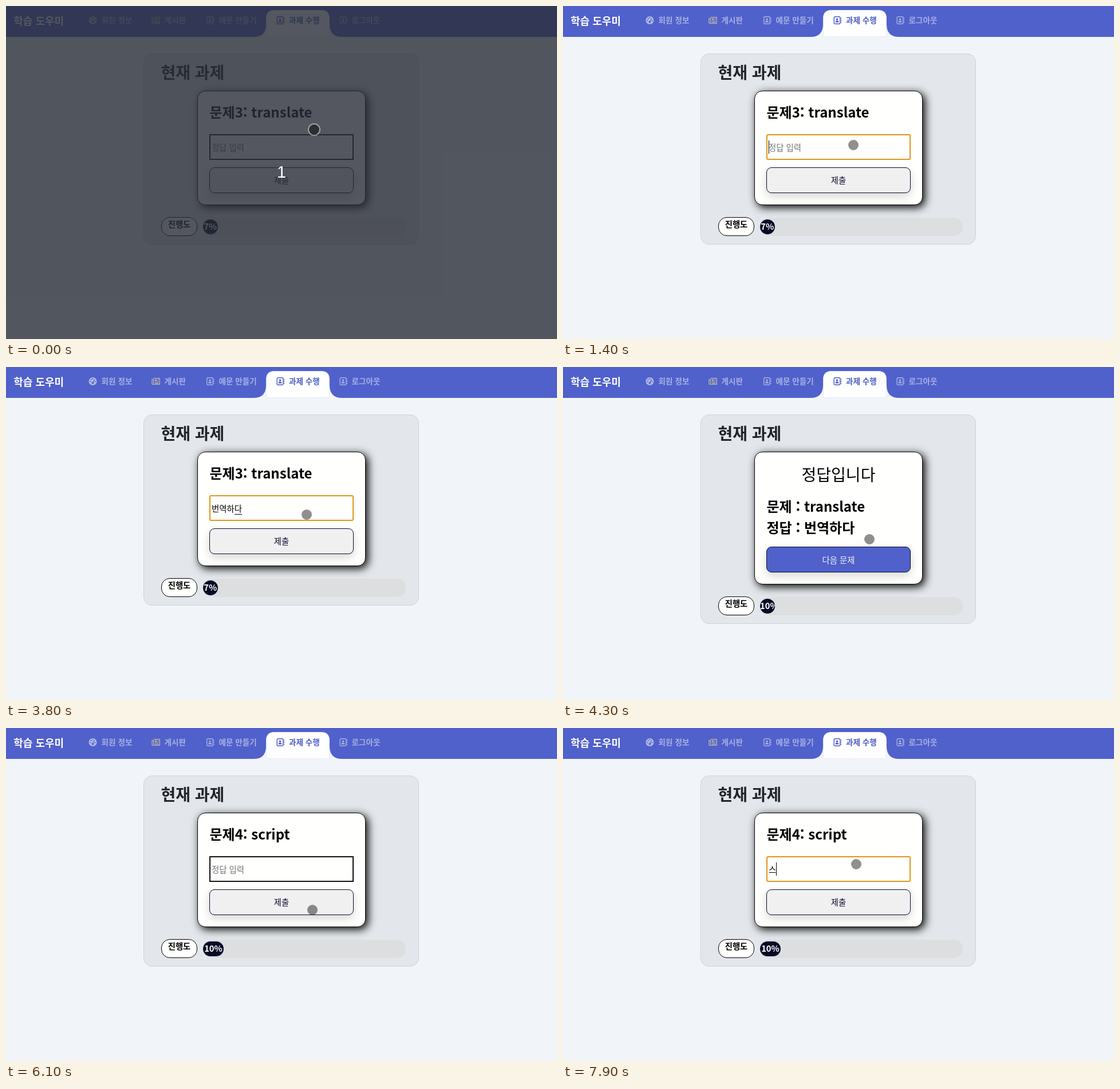
Write an HTML page that moves like this. It is 962 px wide and 582 px high and loops after 8 s.

```html
<!DOCTYPE html>
<html lang="ko">
<head>
<meta charset="utf-8">
<title>학습 도우미</title>
<style>
  html, body { margin: 0; width: 100%; height: 100%; overflow: hidden; }
  body { background: #f1f5fa; font-family: "Noto Sans CJK KR", "Noto Sans CJK", "Noto Sans", sans-serif; color: #000; }
  #stage { position: relative; width: 962px; height: 582px; overflow: hidden; background: #f1f5fa; --grow: 0px; }
  #stage * { box-sizing: border-box; }
  #stage > *, .at { position: absolute; }
  .t {
    position: absolute; white-space: pre; line-height: 40px;
    left: calc(var(--x) * 1px);
    top: calc((var(--y) - .056 * var(--s) - 20) * 1px);
    font-size: calc(var(--s) * 1px);
  }
  .c { transform: translateX(-50%); }
  .nav { --y: 25; --s: 13.6; color: #a8b0e5; }
  .body { --s: 14.4; }
  .head { --s: 24; }
  .group { left: 0; top: 0; width: 962px; height: 582px; }
  #card {
    left: 240px; top: 83px; width: 481px; height: calc(334px + var(--grow));
    background: #e3e7eb; border: 1.5px solid #cdd3d6; border-radius: 15px;
  }
  #dialog {
    left: 334px; top: 148px; width: 294px; height: calc(200px + var(--grow));
    background: #fffffe; border: 1px solid #000; border-radius: 14px; box-shadow: 4px 4px 15px #000;
  }
  .btn {
    left: 355px; width: 252px; height: 45px; border: 1px solid #0b0b30; border-radius: 9px;
    box-shadow: 0 6px 15px rgba(0, 0, 0, .16);
  }
  #input { left: 355px; top: 224px; width: 252px; height: 45px; border: 2px solid #111; background: #fffffe; }
  #input.focus { border-color: #e0961a; border-radius: 3px; }
  #typed span { border-bottom: 1px solid #000; }
  #caret { top: 235px; width: 1px; height: 23px; background: #000; }
  #progress { left: 0; top: var(--grow); width: 962px; height: 450px; }
  #pill { left: 271px; top: 369px; width: 63px; height: 33px; background: #fffffe; border: 1px solid #000; border-radius: 15px; }
  #track { left: 344px; top: 370px; width: 354px; height: 32px; background: #dddee0; border-radius: 15px; }
  #fill {
    left: 344px; top: 373px; height: 26px; border-radius: 13px; overflow: hidden;
    background: #070a26; color: #fff; font: bold 14.8px/24px "Noto Sans CJK KR", "Noto Sans CJK", sans-serif;
    text-align: center; white-space: nowrap;
  }
  #dim { left: 0; top: 0; width: 962px; height: 582px; background: rgba(42, 46, 55, .8); }
  #count { left: 481px; top: 274px; color: #fff; font: 29px/32px "Liberation Sans", Arial, sans-serif; transform: translateX(-50%); }
  #cursor { width: 18px; height: 18px; margin: -9px; border-radius: 50%; background: rgba(0, 0, 0, .44); }
  #cursor.down { background: rgba(20, 20, 20, .6); box-shadow: 0 0 0 2px rgba(255, 255, 255, .45); }
</style>
</head>
<body>
<div id="stage">
  <svg width="962" height="56" style="left:0;top:0">
    <defs>
      <g id="book" fill="none" stroke="currentColor" stroke-width="1.4">
        <rect x=".7" y=".7" width="10.6" height="12.6" rx="1.6"/>
        <path d="M13 2.5v2M13 6v2M13 9.5v2" stroke-width="1.2"/>
        <circle cx="6" cy="5.2" r="1.7" fill="currentColor" stroke="none"/>
        <path d="M3 10.4q0-2.8 3-2.8t3 2.8z" fill="currentColor" stroke="none"/>
      </g>
    </defs>
    <path fill="#5061cb" d="M0 0H962V54H587Q565 54 565 32V22Q565 7 550 7H469Q454 7 454 22V32Q454 54 432 54H0Z"/>
    <path fill="#fff" stroke="#e3e6f3" stroke-width=".8" d="M454.5 53.5V22Q454.5 7.5 469 7.5H550Q564.5 7.5 564.5 22V53.5Z"/>
    <circle cx="151.5" cy="25" r="7" fill="#b0b7e7"/>
    <g fill="#5061cb">
      <circle cx="147.3" cy="25.5" r="1"/><circle cx="148.6" cy="22" r="1"/>
      <circle cx="151.5" cy="20.6" r="1"/><circle cx="155.7" cy="25.5" r="1"/>
      <circle cx="151.5" cy="27.8" r="1.9"/>
    </g>
    <path d="M151.5 27.5L154.6 21.8" stroke="#5061cb" stroke-width="1.2"/>
    <g fill="none" stroke="#b5aeaa" stroke-width="1.4">
      <path d="M257.7 19.7H268.3V30.3H256.4Q255 30.3 255 29V22H257.7V29"/>
      <path d="M260 26.3H266.4M260 28.4H266.4M264.8 22.2H266.6M264.8 24.2H266.6" stroke-width="1.1"/>
      <path d="M260 21.6H263.4V24.8H260Z" fill="#b5aeaa" stroke="none"/>
    </g>
    <use href="#book" x="350" y="18" color="#a8b0e5"/>
    <use href="#book" x="472.5" y="18" color="#4c5cc4"/>
    <use href="#book" x="582.5" y="18" color="#a8b0e5"/>
  </svg>
  <b class="t" style="--x:13.3;--y:26;--s:18;color:#fff">학습 도우미</b>
  <b class="t nav" style="--x:166.6">회원 정보</b>
  <b class="t nav" style="--x:276.6">게시판</b>
  <b class="t nav" style="--x:371.5">예문 만들기</b>
  <b class="t nav" style="--x:494;color:#4c5cc4">과제 수행</b>
  <b class="t nav" style="--x:603.6">로그아웃</b>

  <div id="card"></div>
  <b class="t" style="--x:270.5;--y:117;--s:28;color:#212529">현재 과제</b>
  <div id="dialog"></div>

  <div id="ask" class="group">
    <b id="question" class="t head" style="--x:355.5;--y:186"></b>
    <div id="input" class="at"></div>
    <span id="hint" class="t body" style="--x:359;--y:247.5;color:#757575">정답 입력</span>
    <span id="typed" class="t body" style="--x:359;--y:247.5"></span>
    <div id="caret" class="at"></div>
    <div class="at btn" style="top:282px;background:#f0f0f0"></div>
    <span class="t body c" style="--x:481;--y:305;color:#0d0d30">제출</span>
  </div>

  <div id="result" class="group">
    <span class="t c" style="--x:481;--y:188.5;--s:28;font-weight:500">정답입니다</span>
    <b class="t head" style="--x:355.5;--y:244">문제 : translate</b>
    <b class="t head" style="--x:355.5;--y:281">정답 : 번역하다</b>
    <div class="at btn" style="top:314px;background:#5061cb"></div>
    <span class="t body c" style="--x:481;--y:338;color:#f0f1fb">다음 문제</span>
  </div>

  <div id="progress">
    <div id="pill" class="at"></div>
    <b class="t body c" style="--x:302.5;--y:382">진행도</b>
    <div id="track" class="at"></div>
    <div id="fill" class="at"></div>
  </div>

  <div id="dim"></div>
  <div id="count">1</div>
  <div id="cursor"></div>
</div>
<script>
const LOOP = 8000, STEP = 100;
const $ = id => document.getElementById(id);

// [time, x, y]
const path = [
  [0, 538, 216], [100, 544, 221], [200, 546, 223],
  [500, 537, 227], [600, 517, 238], [700, 507, 243],
  [3800, 525, 258], [3900, 543, 288], [4000, 535, 301],
  [4900, 532, 302], [5000, 531, 306], [5100, 533, 316], [5200, 537, 327], [5300, 540, 335], [5400, 540, 337],
  [6100, 535, 318], [6200, 524, 280], [6300, 514, 247], [6400, 512, 238]
];
const presses = [[0, 100], [1300, 1400], [4200, 4300], [5500, 6100]];
const focused = [[1400, 4300], [6600, 8000]];
const blinks = [[1800, 2000], [3400, 3900], [7000, 7300]];

// [time, text, last syllable still being composed]
const typing = [
  [0, ""],
  [2000, "ㅂ", 1], [2100, "버", 1], [2200, "번", 1], [2300, "번ㅇ", 1], [2400, "번여", 1], [2500, "번역", 1],
  [2700, "번역ㅎ", 1], [2800, "번역하", 1], [2900, "번역핟", 1], [3000, "번역하다", 1],
  [4300, ""],
  [7300, "ㅅ", 1], [7500, "스ㅋ", 1], [7900, "스"]
];

const within = (spans, t) => spans.some(([a, b]) => t >= a && t < b);
const latest = (rows, t) => rows.filter(r => r[0] <= t).pop();
const show = (id, on) => { $(id).style.display = on ? "" : "none"; };
const easeOut = p => 1 - (1 - p) ** 2.2;

let last = -1;
function draw(t) {
  const done = t >= 4300 && t < 5800;
  $("stage").style.setProperty("--grow", done ? "32px" : "0px");
  show("ask", !done);
  show("result", done);
  show("dim", t < 100);
  show("count", t < 100);

  $("question").textContent = t < 4300 ? "문제3: translate" : "문제4: script";
  const focus = within(focused, t);
  $("input").classList.toggle("focus", focus);

  const [, text, composing] = latest(typing, t);
  show("hint", !text);
  const cut = composing ? text.length - 1 : text.length;
  const tail = document.createElement("span");
  tail.textContent = text.slice(cut);
  $("typed").replaceChildren(text.slice(0, cut), ...(composing ? [tail] : []));
  show("caret", focus && !within(blinks, t));
  $("caret").style.left = Math.round(359 + text.length * .92 * 14.4) + "px";

  const p = Math.min(1, Math.max(0, (t - 4300) / 400));
  $("fill").style.width = 25.5 + 10.5 * easeOut(p) + "px";
  $("fill").textContent = t < 4300 ? "7%" : "10%";

  const [, x, y] = latest(path, t);
  const cursor = $("cursor");
  cursor.style.left = x + "px";
  cursor.style.top = y + "px";
  cursor.classList.toggle("down", within(presses, t));
}

const start = performance.now();
function tick() {
  const now = Math.max(0, performance.now() - start) % LOOP;
  const t = Math.floor(now / STEP) * STEP;
  if (t !== last) draw(last = t);
  requestAnimationFrame(tick);
}
tick();
</script>
</body>
</html>
```
